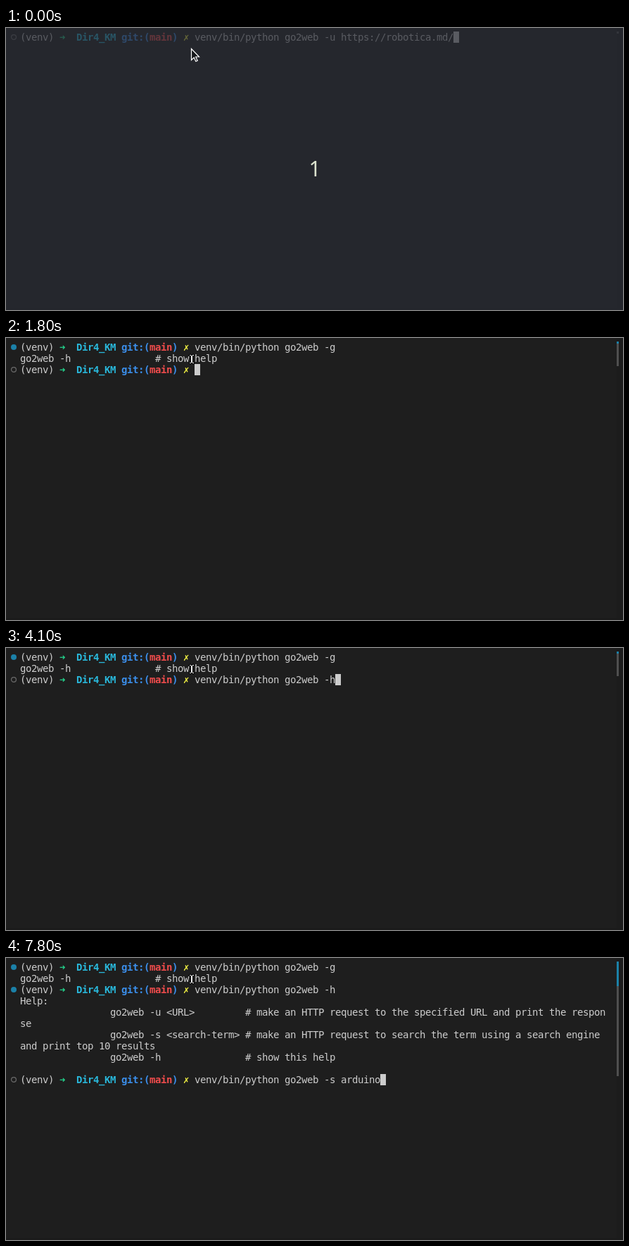
Write an HTML page with a canvas that moves like this. It is 877 px wide and 401 px high and loops after 8 s.

```html
<!DOCTYPE html>
<html lang="en">
<head>
<meta charset="utf-8">
<title>Terminal session</title>
<style>
  html, body { margin: 0; width: 877px; height: 401px; overflow: hidden; background: #1e1e1e; }
  canvas { display: block; }
</style>
</head>
<body>
<canvas id="stage" width="877" height="401"></canvas>
<script>
const ctx = document.getElementById('stage').getContext('2d');
const LOOP = 8000, CELL = 8, ROW = 16, LEFT = 20, TOP = 5;
const FG = '#cccccc', BLUE = '#1b81a8', BAR = '#4f4f4f';
const MONO = '14px "DejaVu Sans Mono", monospace';

const PROMPT = [
  [0, '(venv)', FG],
  [7, '➜', '#23d18b', true],
  [10, 'Dir4_KM', '#29b8db', true],
  [18, 'git:(', '#3b8eea', true],
  [23, 'main', '#f14c4c', true],
  [27, ')', '#3b8eea', true],
  [29, '✗', '#f5f543', true]
];
const CMD_COL = 31;
const go = args => 'venv/bin/python go2web ' + args;
const URL_CMD = go('-u https://robotica.md/');
const SEARCH = go('-s arduino'), HELP = go('-h'), BAD = go('-g');

const gap = n => ' '.repeat(n);
const HINT = 'go2web -h' + gap(15) + '# show help';
const USAGE = [
  'Help:',
  gap(16) + 'go2web -u <URL>' + gap(9) + '# make an HTTP request to the specified URL and print the respon',
  'se',
  gap(16) + 'go2web -s <search-term> # make an HTTP request to search the term using a search engine',
  'and print top 10 results',
  gap(16) + 'go2web -h' + gap(15) + '# show this help',
  ''
];

// A string is plain output, an object is a prompt line.
const ask = cmd => ({ cmd });
const ran = cmd => ({ cmd, done: true });
const first = [ran(BAD), HINT];
const second = [...first, ran(HELP), ...USAGE];

// [start ms, lines, scrollbar height, blue part of it]
const STEPS = [
  [0, [ask(URL_CMD)], 3, 0],
  [200, [ask(HELP)], 3, 0],
  [700, [ask(BAD)], 3, 0],
  [1600, [ask(BAD), ''], 19, 0],
  [1700, [...first, ''], 35, 3],
  [1800, [...first, ask('')], 35, 3],
  [2600, [...first, ask(BAD)], 35, 3],
  [2800, [...first, ask('')], 35, 3],
  [3300, [...first, ask(SEARCH)], 35, 3],
  [3700, [...first, ask(URL_CMD)], 35, 3],
  [4100, [...first, ask(HELP)], 35, 3],
  [5100, [...first, ask(HELP), ''], 51, 3],
  [5200, [...second, ''], 163, 35],
  [5300, [...second, ask('')], 163, 35],
  [6500, [...second, ask(HELP)], 163, 35],
  [7000, [...second, ask(BAD)], 163, 35],
  [7500, [...second, ask('')], 163, 35],
  [7800, [...second, ask(SEARCH)], 163, 35]
];

function box(x, y, w, h, color) {
  ctx.fillStyle = color;
  ctx.fillRect(x, y, w, h);
}

function write(row, col, text, color = FG, bold = false) {
  ctx.font = (bold ? 'bold ' : '') + MONO;
  ctx.fillStyle = color;
  [...text].forEach((ch, i) => {
    if (ch !== ' ') ctx.fillText(ch, LEFT + (col + i) * CELL, TOP + row * ROW + 13);
  });
}

function mark(row, done) {
  ctx.beginPath();
  ctx.arc(11, TOP + row * ROW + 8, done ? 4 : 3.4, 0, 7);
  if (done) {
    ctx.fillStyle = BLUE;
    ctx.fill();
  } else {
    ctx.strokeStyle = '#6c6c6c';
    ctx.lineWidth = 1.2;
    ctx.stroke();
  }
}

function drawLine(line, row) {
  if (typeof line === 'string') {
    write(row, 0, line);
    return line.length;
  }
  mark(row, line.done);
  PROMPT.forEach(part => write(row, ...part));
  write(row, CMD_COL, line.cmd);
  return CMD_COL + line.cmd.length;
}

function drawTerminal([, lines, bar, blue]) {
  box(0, 0, 877, 401, '#1e1e1e');
  box(868, 0, 9, 401, '#1c1c1c');
  box(0, 398, 877, 3, '#1b1b1b');
  let end = 0;
  lines.forEach((line, row) => { end = drawLine(line, row); });
  box(LEFT + end * CELL, TOP + (lines.length - 1) * ROW, CELL, ROW, FG);
  box(868, TOP, 3, bar, BAR);
  box(868, TOP, 3, blue, BLUE);
}

function drawBeam() {
  const parts = [[261, 24, 2, 1], [265, 24, 2, 1], [263, 25, 2, 10], [261, 35, 2, 1], [265, 35, 2, 1]];
  parts.forEach(([x, y, w, h]) => box(x - 1, y - 1, w + 2, h + 2, '#000'));
  parts.forEach(([x, y, w, h]) => box(x, y, w, h, '#fff'));
}

function drawCountdown() {
  ctx.globalAlpha = 0.7;
  box(0, 0, 877, 401, '#282c34');
  ctx.globalAlpha = 1;
  ctx.font = '30px "Noto Sans", sans-serif';
  ctx.textAlign = 'center';
  ctx.fillStyle = '#dce3cf';
  ctx.fillText('1', 439, 211);
  ctx.textAlign = 'left';

  const arrow = new Path2D('M263.5 29.5V45.5L267.2 42L269.8 47.5L272.2 46.4L269.7 41H274.5Z');
  ctx.fillStyle = '#15171a';
  ctx.fill(arrow);
  ctx.strokeStyle = '#fff';
  ctx.lineWidth = 1.2;
  ctx.stroke(arrow);
}

function frame() {
  const t = performance.now() % LOOP;
  drawTerminal(STEPS.findLast(step => step[0] <= t));
  if (t < 100) drawCountdown();
  else drawBeam();
  requestAnimationFrame(frame);
}
frame();
</script>
</body>
</html>
```
